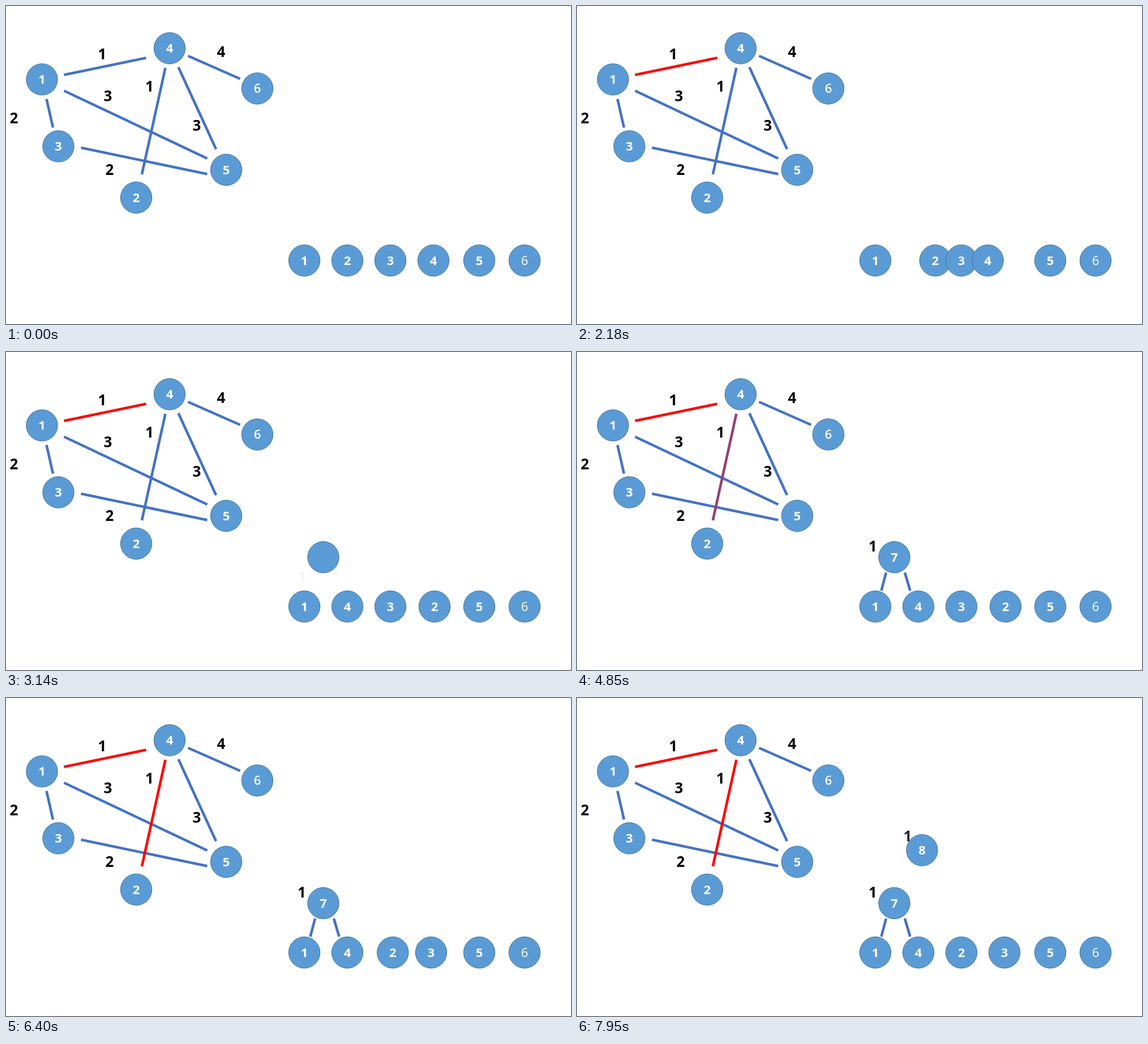
Recreate the animation shown at these times as an HTML page. Size 998 by 561 pixels, loop 7.99 s.

```html
<!DOCTYPE html>
<html lang="en">
<head>
<meta charset="utf-8">
<title>Building a tree from a weighted graph</title>
<style>
  html, body { margin: 0; width: 100%; height: 100%; overflow: hidden; background: #fff; }
  svg { display: block; width: 998px; height: 561px; }
  text { font-family: "Open Sans", "Noto Sans", sans-serif; font-weight: 700; text-anchor: middle; }
  circle { fill: #5b9bd5; stroke: #41719c; stroke-width: 1; }
  line { stroke: #4472c4; stroke-width: 4.6; }
</style>
</head>
<body>
<svg id="stage" viewBox="0 0 998 561"></svg>
<script>
const LOOP = 7990;
const stage = document.getElementById('stage');

function add(parent, tag, attrs, content = '') {
  const el = document.createElementNS('http://www.w3.org/2000/svg', tag);
  for (const key in attrs) el.setAttribute(key, attrs[key]);
  el.textContent = content;
  return parent.appendChild(el);
}

const edge = (x1, y1, x2, y2) => add(stage, 'line', { x1, y1, x2, y2 });

const label = (x, y, value) =>
  add(stage, 'text', { x, y: y + 9.2, 'font-size': 26 }, value);

function node(x, y, value, weight = 700) {
  const group = add(stage, 'g', { transform: `translate(${x} ${y})` });
  const disc = add(group, 'circle', { r: 27.7 });
  const digit = add(group, 'text', { y: 7.9, fill: '#fff', 'font-size': 22 }, value);
  digit.style.fontWeight = weight;
  return { group, disc, digit };
}

// Graph
const edge14 = edge(102.5, 121.5, 247.5, 91.5);
edge(102.5, 149.5, 355.5, 269);
edge(71.5, 164, 83, 214.5);
edge(132.5, 250, 355.5, 296.5);
edge(321.5, 88, 413.5, 128.5);
edge(304.5, 108, 371, 252.5);
const edge42 = edge(281.5, 109, 240, 297);

[[170, 85, 1], [380, 81, 4], [253.5, 142, 1], [180, 159, 3],
 [337, 211, 3], [14, 198, 2], [183, 289, 2]].forEach(item => label(...item));
[[63.5, 129.5, 1], [289, 74.5, 4], [444, 145.5, 6, 600], [92.5, 247.5, 3],
 [389, 289, 5], [230, 338, 2]].forEach(item => node(...item));

// Tree
const branches = [edge(546, 389, 537.5, 421), edge(579, 389, 588.5, 421)];
const label7 = label(522.5, 343, 1);
const label8 = label(584, 235.6, 1);
const leaves = [527, 603, 679, 755, 836, 916].map((x, i) => node(x, 449, i + 1, i === 5 ? 400 : 700));
const node7 = node(560.5, 362, 7);
const node8 = node(609.5, 268.5, 8);

const progress = (t, start, duration) => Math.min(1, Math.max(0, (t - start) / duration));
const smooth = u => u < 0.5 ? 2 * u * u : 1 - 2 * (1 - u) ** 2;
const mix = (a, b, u) => a + (b - a) * u;

function redden(line, u) {
  line.style.stroke = `rgb(${mix(68, 255, u)}, ${mix(114, 0, u)}, ${mix(196, 0, u)})`;
}

function zoom(el, u) {
  el.setAttribute('transform', `scale(${u})`);
  el.setAttribute('opacity', u);
}

function rise(el, u) {
  el.setAttribute('transform', `translate(0 ${56.1 * (1 - u)})`);
  el.setAttribute('opacity', u);
}

function enter({ disc, digit }, text, t, start) {
  zoom(disc, progress(t, start, 500));
  zoom(digit, progress(t, start + 595, 500));
  rise(text, progress(t, start + 600, 1000));
}

const moveLeaf = (value, x) =>
  leaves[value - 1].group.setAttribute('transform', `translate(${x} 449)`);

function render(t) {
  redden(edge14, progress(t, 20, 2000));
  redden(edge42, progress(t, 4015, 2000));

  const first = smooth(progress(t, 2041, 450));
  const second = smooth(progress(t, 6025, 450));
  moveLeaf(4, mix(755, 603, first));
  moveLeaf(2, mix(mix(603, 757, first), 679, second));
  moveLeaf(3, mix(679, 755, second));

  enter(node7, label7, t, 2500);
  enter(node8, label8, t, 6495);
  branches.forEach(line => line.setAttribute('opacity', progress(t, 4000, 500)));
}

const origin = performance.now();
function tick() {
  render((performance.now() - origin) % LOOP);
  requestAnimationFrame(tick);
}
render(0);
requestAnimationFrame(tick);
</script>
</body>
</html>
```
